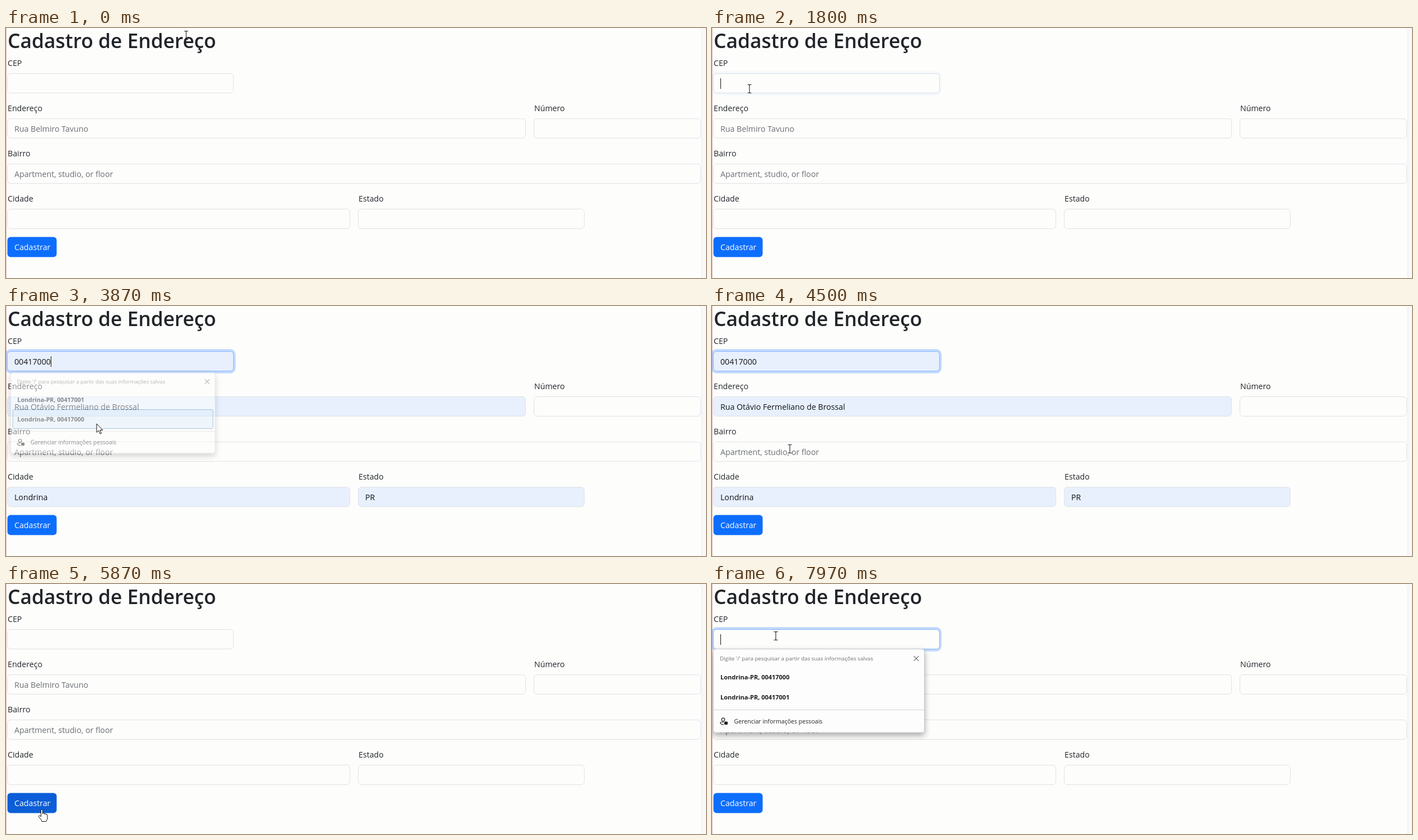
An HTML page for the animation above (8000 ms loop, 1251 by 448 pixels).

```html
<!DOCTYPE html>
<html lang="pt-BR">
<head>
<meta charset="utf-8">
<title>Cadastro de Endereço</title>
<style>
  html, body { margin: 0; width: 100%; height: 100%; overflow: hidden; background: #fdfdfc; }
  svg { display: block; font: 14.2px "Open Sans", "Noto Sans", sans-serif; fill: #212529; }
  .field { stroke: #dee2e6; }
  .small { font-size: 10.6px; }
  .row { font-size: 11px; font-weight: 700; fill: #1b1b1b; }
  .line { fill: none; stroke: #222; }
</style>
</head>
<body>
<svg id="stage" width="1251" height="448" viewBox="0 0 1251 448">
  <defs>
    <filter id="shadow" x="-10%" y="-20%" width="120%" height="150%">
      <feDropShadow dx="0" dy="5" stdDeviation="5.5" flood-opacity=".34"/>
    </filter>
  </defs>
  <rect x="1244" width="7" height="448" fill="#f8f8fb"/>
  <path d="M1238 0q5.5 1 5.5 8V448" fill="none" stroke="#ebebeb"/>
  <rect width="1" height="448" fill="#dfbfb5"/>
  <text x="3" y="36" font-size="35.4" font-weight="600">Cadastro de Endereço</text>
  <g id="form"></g>
  <rect id="button" x="2.5" y="374.5" width="88" height="36" rx="5.7"/>
  <text x="15" y="398" fill="#fff">Cadastrar</text>
  <rect id="caret" y="90" width="1" height="19" fill="#111"/>
  <g id="popup">
    <rect x="2.5" y="116.5" width="377" height="149.5" rx="4" fill="#fdfdfd" stroke="#c4c4c4" stroke-width=".8" filter="url(#shadow)"/>
    <text x="14" y="137" font-size="9.75" fill="#707070">Digite '/' para pesquisar a partir das suas informações salvas</text>
    <path class="line" d="M360.5 129l9 9m0-9l-9 9"/>
    <rect id="mark" x="6.5" width="369" height="35" rx="2" fill="#e1effa" stroke="#4f8cbd"/>
    <text class="row" x="15" y="171"></text>
    <text class="row" x="15" y="207"></text>
    <path d="M3 225.5H379" stroke="#d4d4d4"/>
    <g class="line" stroke-width="1.2">
      <circle cx="20" cy="243" r="2.8"/>
      <path d="M21 247.5h-5q-1.5 0-1 1.5 1 3 6 3"/>
      <rect x="22.5" y="247" width="5" height="4.5" rx="1" fill="#222"/>
    </g>
    <text class="small" x="39.5" y="250">Gerenciar informações pessoais</text>
  </g>
  <g id="cursor" stroke-linejoin="round">
    <path d="M-3.5-7.5h2.5l1 1 1-1h2.5M0-6.5v13M-3.5 7.5h2.5l1-1 1 1h2.5" fill="none" stroke="#222" stroke-width="1.1"/>
    <path d="M0 0V15.5L3.6 12.2 6 18 8.4 17 6 11.4H10.8Z" fill="#fff" stroke="#111"/>
    <path d="M-1.5 13V1.5a1.5 1.5 0 0 1 3 0V8c0-2 3-2 3 0v.8c0-2 3-1.8 3 .3v.8c0-1.8 2.5-1.5 2.5.3V15c0 3-1.5 4-2 6.5H0C-.5 18-3.5 16-5.5 13c-1-2 1.5-3 2.5-1.5z" fill="#fff" stroke="#111"/>
  </g>
</svg>
<script>
const LOOP = 8000;
const CLICK = 1770, PICK = 3780, SUBMIT = 5480, CLICK2 = 7560;
const CODES = ["00417001", "00417000"];
const GREY = "#6a6e72", INK = "#111315";

// Cursor stops: time, x, y
const PATH = [
  [250, 322, 13], [1550, 67, 109], [2080, 67, 109], [2450, 140, 172],
  [2530, 140, 172], [2850, 162, 211], [4250, 162, 211], [5050, 64, 404],
  [6700, 64, 404], [6930, 124, 170], [6990, 124, 170], [7380, 114, 93]
];

const $ = id => document.getElementById(id);
const set = (el, attrs) => { for (const k in attrs) el.setAttribute(k, attrs[k]); };
const add = (tag, attrs, text = "") => {
  const el = document.createElementNS("http://www.w3.org/2000/svg", tag);
  set(el, attrs);
  el.textContent = text;
  return $("form").appendChild(el);
};
const ramp = (t, from, to) => {
  const k = Math.min(1, Math.max(0, (t - from) / (to - from)));
  return k * k * (3 - 2 * k);
};
const mix = (a, b, k) => `rgb(${a.map((v, i) => Math.round(v + (b[i] - v) * k))})`;
const inside = ([px, py], x, y, w, h) => px >= x && px <= x + w && py >= y && py <= y + h;

function field(label, x, y, w, value = "", hint = "") {
  add("text", { x, y: y - 13 }, label);
  const box = add("rect", { class: "field", x: x - .5, y: y + .5, width: w, height: 35, rx: 5.7 });
  const text = add("text", { x: x + 12, y: y + 24 });
  return { x, y, w, value, hint, box, text };
}

const ring = add("rect", { x: .6, y: 79.1, width: 407.8, height: 39.8, rx: 7.6, fill: "none", stroke: "#0d6efd", "stroke-width": 3.8 });
const fields = [
  field("CEP", 3, 81, 404, CODES[1]),
  field("Endereço", 3, 162, 926, "Rua Otávio Fermeliano de Brossal", "Rua Belmiro Tavuno"),
  field("Número", 944, 162, 298),
  field("Bairro", 3, 243, 1239, "", "Apartment, studio, or floor"),
  field("Cidade", 3, 324, 612, "Londrina"),
  field("Estado", 630, 324, 404, "PR")
];
const cep = fields[0];
const rows = document.querySelectorAll(".row");
const [beam, arrow, hand] = $("cursor").children;

function cursorAt(t) {
  let [, x, y] = PATH[0];
  for (let i = 1; i < PATH.length; i++) {
    const k = ramp(t, PATH[i - 1][0], PATH[i][0]);
    x += (PATH[i][1] - PATH[i - 1][1]) * k;
    y += (PATH[i][2] - PATH[i - 1][2]) * k;
  }
  return [x, y];
}

function drawPopup(shown, row, codes) {
  set($("popup"), {
    opacity: shown,
    transform: `translate(191 191.5) scale(${.94 + .06 * shown}) translate(-191 -191.5)`
  });
  set($("mark"), { y: row > 0 ? 185.5 : 149.5, opacity: row < 0 ? 0 : 1 });
  rows.forEach((el, i) => el.textContent = "Londrina-PR, " + codes[i]);
}

function drawFields(filled, code, focus) {
  for (const f of fields) {
    const value = filled ? (f === cep ? code : f.value) : "";
    f.text.textContent = value || f.hint;
    set(f.text, { fill: value ? INK : GREY });
    set(f.box, { fill: value ? "#e8f0fe" : "#fdfdfc" });
  }
  cep.box.style.stroke = mix([222, 226, 230], [134, 183, 254], focus);
  set(ring, { opacity: .25 * focus });
}

function drawCursor(p, overPopup) {
  const onButton = inside(p, 3, 375, 87, 35);
  const onText = !overPopup &&
    (inside(p, 3, 0, 372, 46) || fields.some(f => inside(p, f.x, f.y, f.w, 36)));
  set($("cursor"), { transform: `translate(${p})` });
  set(beam, { opacity: +onText });
  set(hand, { opacity: +onButton });
  set(arrow, { opacity: +(!onText && !onButton) });
}

function draw(t) {
  const p = cursorAt(t);
  const again = t >= SUBMIT;
  const picked = t >= PICK && !again;
  const codes = again ? [...CODES].reverse() : CODES;
  const shown = again ? ramp(t, 7740, 7920) : ramp(t, 1940, 2100) - ramp(t, PICK, 3960);
  const overPopup = shown > 0 && inside(p, 3, 117, 377, 149);
  const row = overPopup ? [150, 185.5].findIndex(y => inside(p, 6, y, 369, 35.5)) : -1;
  const filled = picked || row >= 0;
  const focus = again ? ramp(t, CLICK2, CLICK2 + 150) : ramp(t, CLICK, CLICK + 150);

  drawFields(filled, picked ? CODES[1] : codes[row], focus);
  drawPopup(shown, row, codes);
  drawCursor(p, overPopup);

  const hover = ramp(t, 4900, 5050) - ramp(t, 6720, 6870);
  set($("button"), { fill: mix([13, 110, 253], [11, 94, 215], hover) });

  const since = t - (again ? CLICK2 : picked ? PICK : CLICK);
  set($("caret"), {
    x: 15 + (picked ? Math.round(cep.text.getComputedTextLength()) : 0),
    opacity: +(since >= 0 && since % 1000 < 500)
  });
}

function tick() {
  draw(performance.now() % LOOP);
  requestAnimationFrame(tick);
}
tick();
</script>
</body>
</html>
```
